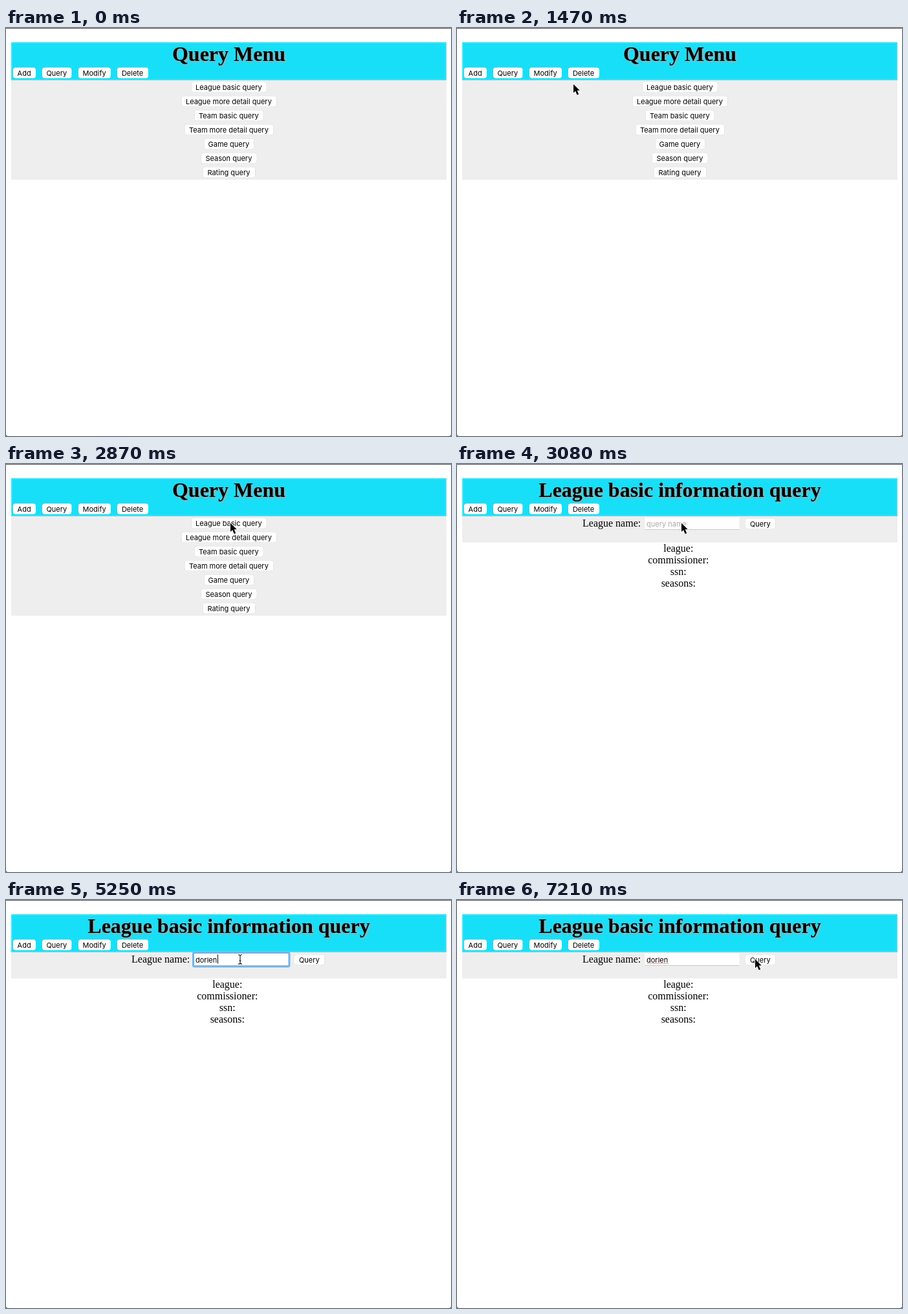
Recreate the animation shown at these times as an HTML page. Size 688 by 632 pixels, loop 8 s.

```html
<!DOCTYPE html>
<html lang="en">
<head>
<meta charset="utf-8">
<title>League query</title>
<style>
html, body { margin: 0; width: 100%; height: 100%; overflow: hidden; background: #fff; }
svg { display: block; width: 100%; height: 100%; }
.ui { font: 11px Inter, Roboto, sans-serif; }
.serif { font: 16px "Liberation Serif", "Noto Serif", serif; }
.title { font: bold 32px "Liberation Serif", "Noto Serif", serif; text-shadow: 2px 2px 3px #aaa; }
.mid { text-anchor: middle; }
.button { filter: drop-shadow(0 .5px .6px rgba(0, 0, 0, .35)); }
</style>
</head>
<body>
<svg viewBox="0 0 688 632">
  <rect width="688" height="632" fill="#fff"/>
  <rect width="688" height="1" fill="#555"/>
  <path d="M0 630v2h2zM688 630v2h-2z" fill="#555"/>
  <rect id="panel" x="8" y="81" width="673" height="154" fill="#eee"/>
  <rect x="8" y="22" width="673" height="59" fill="#18dff8"/>
  <rect x="9" y="23" width="671" height="57" fill="none" stroke="#3ee1f3" stroke-width="2"/>
  <text id="title" class="title mid" x="344.5" y="51"></text>
  <g id="nav"></g>
  <g id="menu"></g>
  <g id="form">
    <text class="serif" x="194" y="97">League name:</text>
    <rect x="290.5" y="83" width="146" height="18.5" fill="#fff"/>
    <path d="M290.5 101.5h146" stroke="#c8c8c8"/>
    <rect id="ring" x="289.5" y="81.5" width="148.5" height="21.5" rx="2" fill="none" stroke="#74b3ea" stroke-width="3"/>
    <text id="value" class="ui" x="293" y="96.5"></text>
    <path id="spelling" d="M294 98.5h33" stroke="#f03030" stroke-dasharray="1 1"/>
    <path id="caret" d="M0 84.5v14" stroke="#000"/>
    <g id="labels" class="serif mid"></g>
  </g>
  <circle id="click" fill="none" stroke="#000" stroke-width="1.4"/>
  <g id="pointer">
    <path id="arrow" d="M0 0V13.6L3.1 10.8 5.7 16.8 8.3 15.7 5.7 9.8H9.8Z" stroke="#fff" stroke-width="1.6" paint-order="stroke"/>
    <path id="beam" d="M-3-7.2Q0-7.2 0-5.2Q0-7.2 3-7.2M0-5.5V5.5M-3 7.2Q0 7.2 0 5.2Q0 7.2 3 7.2M-1.5 2h3" fill="none" stroke="#111" stroke-width="1.1"/>
  </g>
</svg>
<script>
const LOOP = 8000, TICK = 70;
const $ = id => document.getElementById(id);
const show = (id, on) => $(id).setAttribute('display', on ? 'inline' : 'none');
const set = (id, attrs) => {
  for (const [name, value] of Object.entries(attrs)) $(id).setAttribute(name, value);
};

const button = (label, x, y, width) => `
  <rect class="button" x="${x}" y="${y}" width="${width}" height="16.5" rx="3.7" fill="#fff"/>
  <text class="ui mid" x="${x + width / 2 - 0.4}" y="${y + 12.3}">${label}</text>`;

$('nav').innerHTML = [['Add', 11, 35], ['Query', 56, 45.5], ['Modify', 112, 50], ['Delete', 172, 48]]
  .map(([label, x, width]) => button(label, x, 61.3, width)).join('');

$('menu').innerHTML = [
  ['League basic query', 116], ['League more detail query', 147], ['Team basic query', 106],
  ['Team more detail query', 137], ['Game query', 77], ['Season query', 86], ['Rating query', 81]
].map(([label, width], i) => button(label, 344.8 - width / 2, 83.2 + 22 * i, width)).join('');

$('form').insertAdjacentHTML('beforeend', button('Query', 446, 84.2, 46.5));
$('labels').innerHTML = ['league:', 'commissioner:', 'ssn:', 'seasons:']
  .map((label, i) => `<text x="342.3" y="${136 + 18 * i}">${label}</text>`).join('');

// time, x, y of the pointer's hot spot
const path = [
  [280, 382, 605], [350, 377, 450], [420, 362, 240], [490, 344, 85], [560, 329, 13],
  [700, 329, 13], [840, 315, 20], [980, 265, 50], [1120, 200, 84], [1260, 170, 97],
  [1400, 176, 90], [1470, 180, 87], [1540, 239, 86], [1610, 272, 86], [1680, 299, 86],
  [1750, 299, 86], [1890, 327, 80], [2030, 341, 85], [2170, 345.5, 90.5],
  [2800, 345.5, 90.5], [2870, 347, 91.5], [3220, 347, 91.5], [3290, 347, 89],
  [3430, 346.5, 90], [5110, 346.5, 90], [5250, 362, 92], [5390, 402, 96],
  [5530, 440, 95], [5670, 456, 93], [6370, 456, 93], [6510, 461, 91.8]
];

function pointerAt(time) {
  const next = path.findIndex(point => point[0] > time);
  if (next < 0) return path[path.length - 1].slice(1);
  if (next === 0) return path[0].slice(1);
  const [t0, x0, y0] = path[next - 1], [t1, x1, y1] = path[next];
  const k = (time - t0) / (t1 - t0);
  return [x0 + (x1 - x0) * k, y0 + (y1 - y0) * k];
}

const within = (time, from, to) => time >= from && time < to;

function drawClick(time) {
  const start = [2310, 5810].find(from => within(time, from, from + 3 * TICK));
  show('click', start !== undefined);
  if (start === undefined) return;
  const fading = time - start >= 2 * TICK;
  const [x, y] = pointerAt(start);
  set('click', { cx: x - 0.2, cy: y + 0.3, r: fading ? 22.5 : 21.5, opacity: fading ? 0.5 : 1 });
}

function draw(time) {
  const onForm = time >= 3010, typed = time >= 5040;
  show('menu', !onForm);
  show('form', onForm);
  set('panel', { height: onForm ? 40.5 : 154 });
  $('title').textContent = onForm ? 'League basic information query' : 'Query Menu';

  $('value').textContent = typed ? 'dorlen' : 'query name';
  set('value', { fill: typed ? '#000' : '#a9a9a9' });
  show('ring', within(time, 3570, 5950));
  set('ring', { opacity: time < 3640 ? 0.5 : 1 });
  show('spelling', time >= 5950);
  show('caret', within(time, 3570, 4130) || within(time, 4690, 5600));
  set('caret', { transform: `translate(${typed ? 327.5 : 293.5} 0)` });

  const [x, y] = pointerAt(time);
  const beam = time >= 3290 && x < 438;
  set('pointer', { transform: `translate(${x} ${y})` });
  show('pointer', time >= 280 && !within(time, 5040, 5180));
  show('arrow', !beam);
  show('beam', beam);
  drawClick(time);
}

const start = performance.now();
function frame() {
  const time = (performance.now() - start) % LOOP;
  draw(Math.floor(time / TICK) * TICK);
  requestAnimationFrame(frame);
}
frame();
</script>
</body>
</html>
```
